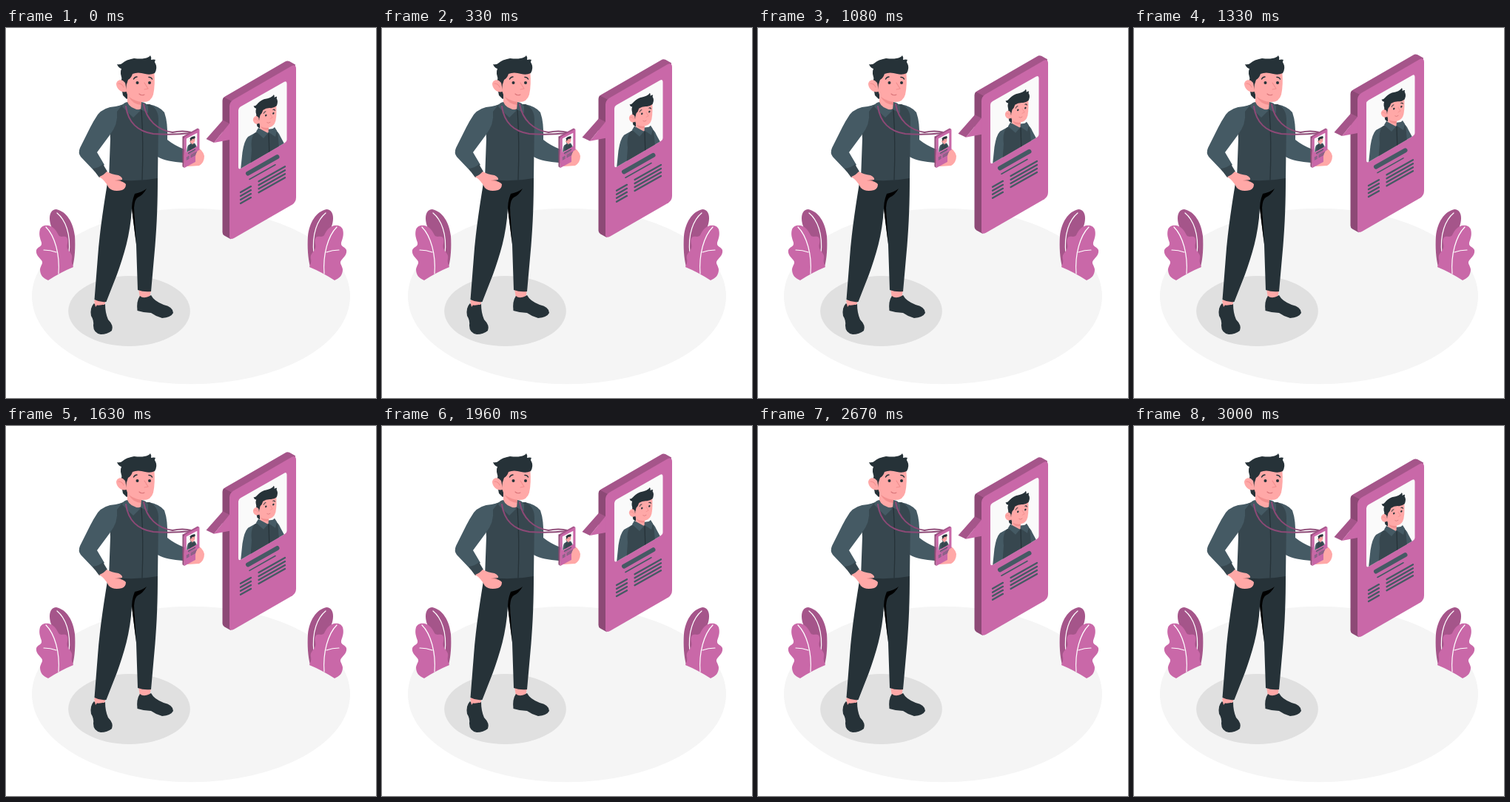
Recreate the animation shown at these times as an HTML page. Size 500 by 500 pixels, loop 3040 ms.

```html
<!DOCTYPE html>
<html lang="en">
<head>
<meta charset="utf-8">
<title>Badge</title>
<style>
html, body { margin: 0; width: 100%; height: 100%; overflow: hidden; background: #fff; }
svg { display: block; width: 100vw; height: 100vh; }
.pink { fill: #c968a8; }
.mid { fill: #a5558a; }
.deep { fill: #8d4976; }
.skin { fill: #ffa8a7; }
.navy { fill: #263238; }
.coat { fill: #37474f; }
.sleeve { fill: #455a64; }
.line { fill: none; stroke-linecap: round; stroke-linejoin: round; }
.vein { stroke: #fff; stroke-width: 1.2; }
.strap { stroke: #8d4976; stroke-width: 2; }
.crease { stroke: #263238; stroke-width: 1.3; }
.blush { stroke: #f28f8f; stroke-width: 1.2; }
</style>
</head>
<body>
<svg viewBox="0 0 500 500">
<defs>
  <g id="leaves">
    <path class="mid" d="M59 257C59 250 62 245 68 245C82 248 91 263 93 281C94 296 93 311 90 323L80 325C84 303 76 290 68 280C62 272 59 265 59 257Z"/>
    <path class="line vein" d="M69 250C80 259 88 278 85 305"/>
    <path class="pink" d="M57 341C50 338 46 334 46 326C47 320 51 318 48 314C44 309 40 306 41 300C43 295 49 296 48 290C46 284 44 279 46 272C48 267 53 266 58 267C65 269 68 274 71 280C74 284 79 280 82 283C86 288 80 294 84 300C88 305 90 307 89 312C88 317 90 320 91 323Q74 330 57 341Z"/>
    <path class="line vein" d="M54 269C66 281 73 306 71 332M51 300Q60 300 68 303"/>
  </g>

  <g id="head">
    <path class="navy" d="M158 60L155 75L158 91L163 96L172 90L174 64Z"/>
    <path class="skin" d="M164 88L164 105Q174 114 183 109L183 98Z"/>
    <path class="skin" d="M165 58L200 56Q202 76 199 90Q196 100 186 100Q173 99 165 93L162 84Z"/>
    <path d="M166 93Q174 99 184 100L183 104Q171 103 166 93Z" fill="#f28f8f"/>
    <path class="skin" d="M161 73C156 68 149 70 149 76C150 83 156 88 163 86Z"/>
    <path class="line blush" d="M152 75Q157 75 159 80"/>
    <path class="navy" d="M158 71Q153 61 156 55Q152 54 150 49Q155 50 158 47Q162 43 173 41Q182 42 187 41Q193 40 195 37Q197 40 196 43Q200 42 202 43Q200 46 202 48Q205 54 201 61Q195 64 188 62Q178 59 171 62Q169 68 165 70L163 76Z"/>
    <circle class="navy" cx="177.5" cy="74" r="2"/>
    <circle class="navy" cx="194" cy="74" r="2"/>
    <path class="line" d="M172.500 69Q174 66 177 66M193 66.500Q196 66 197.500 69" stroke="#263238" stroke-width="1.5"/>
    <path class="line blush" d="M187 74L192 82L187 83"/>
    <path class="line" d="M180 89Q183 92 187 90" stroke="#d9767a" stroke-width="1.1"/>
  </g>

  <clipPath id="pane"><path d="M314 111Q314 108 317 106.300L376 72.800Q379.500 71 379.500 75L379.500 151Q379.500 153.500 377 155L317 190Q314 191.500 314 188Z"/></clipPath>

  <g id="card">
    <path class="mid" d="M293 96Q294 93.500 296 92.500L377 45.600Q380 43.600 383 45L391 49.500L390 56L302 106Z"/>
    <path class="deep" d="M292.500 98Q292.500 95 294.500 93.500L305 99Q302 101 302 106L302 281L304 285.500L295 280.500Q292.500 279 292.500 276Z"/>
    <path class="pink" d="M302 106Q302.500 100 307 97L386 51.200Q392 48.500 392 55L392 229Q392 235 387 238.500L308 284Q302 287 302 281Z"/>
    <g clip-path="url(#pane)">
      <rect x="313" y="69" width="68" height="124" fill="#fafafa"/>
      <path class="sleeve" d="M317 192L319.500 168Q322 152 327 147Q335 142 345 138L361 136Q368 139 371 147L378 160Z"/>
      <path class="coat" d="M330 192L332 164Q330 149 336 142L344 137L354 143L363 135Q368 140 368 150L370 175Z"/>
      <use href="#head" transform="matrix(.61 -.166 0 .68 243 97.2)"/>
      <path class="sleeve" d="M338 140L341 135L354 142L348 149ZM355 141L363 134L366 139L364 147Z"/>
      <path class="line crease" d="M355 142L356 175" stroke-width="1"/>
    </g>
    <g id="lines" class="line" stroke="#455a64"></g>
  </g>
</defs>

<rect width="500" height="500" fill="#fff"/>
<ellipse cx="250" cy="362.5" rx="215" ry="118.700" fill="#f5f5f5"/>
<ellipse cx="166.500" cy="382.500" rx="82.300" ry="47.500" fill="#e0e0e0"/>
<use href="#leaves"/>
<use href="#leaves" transform="matrix(-1 0 0 1 501 0)"/>

<!-- legs -->
<path class="skin" d="M121 364L134 366L133 377L120 375ZM179 352L196 354L194 365L181 365Z"/>
<path class="navy" d="M119 372Q122 377 134 373Q134 385 138 394Q146 402 143 409Q137 414 128 414Q118 412 118 402Q119 395 115 389Q113 378 119 372Z"/>
<path class="navy" d="M181 362Q186 367 196 361Q200 369 213 374Q226 377 226 385Q223 391 211 392Q203 390 196 385Q187 385 177.500 382Q176 369 181 362Z"/>
<path class="skin" d="M119 368L134 370L133 374L124 373L121 377Z"/>
<path class="navy" d="M138 203L205 202C205 236 204 264 201.500 294L196 356Q186 357 178 354L176 293L170 244C168 280 159 308 150 333L135.500 370Q127 371 119.500 367L124 310C127 270 133 235 138 203Z"/>
<path d="M190 217Q184 222 174 224Q169 236 170.500 248L176 292L173 243Q174 231 178 229Q185 226 190 217Z"/>

<!-- jacket -->
<path class="skin" d="M238 166L256 160Q266 164 268 173Q268 182 261 186L246 187L238 181Z"/>
<path class="sleeve" d="M193 103Q208 106 214 114Q219 128 218 151Q228 159 241 164L239 182C226 181 213 179 205 174Q203 168 204 140Z"/>
<path class="coat" d="M151 106L163 101L183 103L194 103Q206 109 206 124L205 203Q173 209 139 204L141 150Q139 124 151 106Z"/>
<path class="sleeve" d="M157 104L148 106Q132 107 124 117Q118 126 114 134L100 162Q97 169 101 174L120 194L133 185L123 168L140 145Q152 130 150 113Z"/>
<path class="coat" d="M117 190Q126 189 131 184L137 194Q133 200 126 202Z"/>
<path class="skin" d="M126 201Q132 199 136 194Q143 198 152 199Q158 202 157 205L149 206Q159 207 162 211Q162 217 157 219Q145 222 139 216Q134 206 126 201Z"/>
<path class="line blush" d="M148 206L155 207"/>
<path class="line crease" d="M183 110Q186 155 184 205"/>
<use href="#head"/>
<path class="sleeve" d="M157 106Q158 101 164 100Q167 109 182 111L172 121Q163 113 157 106ZM183 100Q190 101 192 106L192 115L182 110Z"/>
<path class="line strap" d="M162 106C165 127 178 140 199 143Q224 145 250 142M186 103C190 125 205 138 225 141Q239 138 250 141"/>
<use href="#card" transform="matrix(.231 0 0 .221 170.9 125.8)"/>
<path class="skin" d="M256 173Q258 164 262 165Q266 168 267 173L260 184Q254 185 256 181Z"/>

<g id="float">
  <use href="#card"/>
  <path class="mid" d="M270.500 150L293 124.500L302 129L281 155Z"/>
  <path class="pink" d="M281 155L302.300 128.500L302.300 151Z"/>
</g>
</svg>
<script>
const LOOP = 3040, CYCLE = 72, RISE = 10, SLOPE = 0.565;
const lines = document.getElementById('lines');
const float = document.getElementById('float');

function bar(x, y, len, width) {
  const p = document.createElementNS('http://www.w3.org/2000/svg', 'path');
  p.setAttribute('d', `M${x} ${y}l${len} ${-len * SLOPE}`);
  p.setAttribute('stroke-width', width);
  lines.append(p);
}

bar(327, 196.5, 39.5, 6);
bar(329, 204.5, 35, 1.6);
for (let i = 0; i < 4; i++) {
  bar(317, 222 + i * 5, 14, 2.3);
  bar(341.5, 207.2 + i * 5, 35.5, 2.3);
}

// Straight rise and fall in 24 steps a second.
function draw(now) {
  const step = Math.floor((now % LOOP) * 0.024 + 0.1) % CYCLE;
  const up = RISE * (1 - Math.abs(1 - step * 2 / CYCLE));
  float.setAttribute('transform', `translate(0 ${-up})`);
  requestAnimationFrame(draw);
}
draw(0);
</script>
</body>
</html>
```
